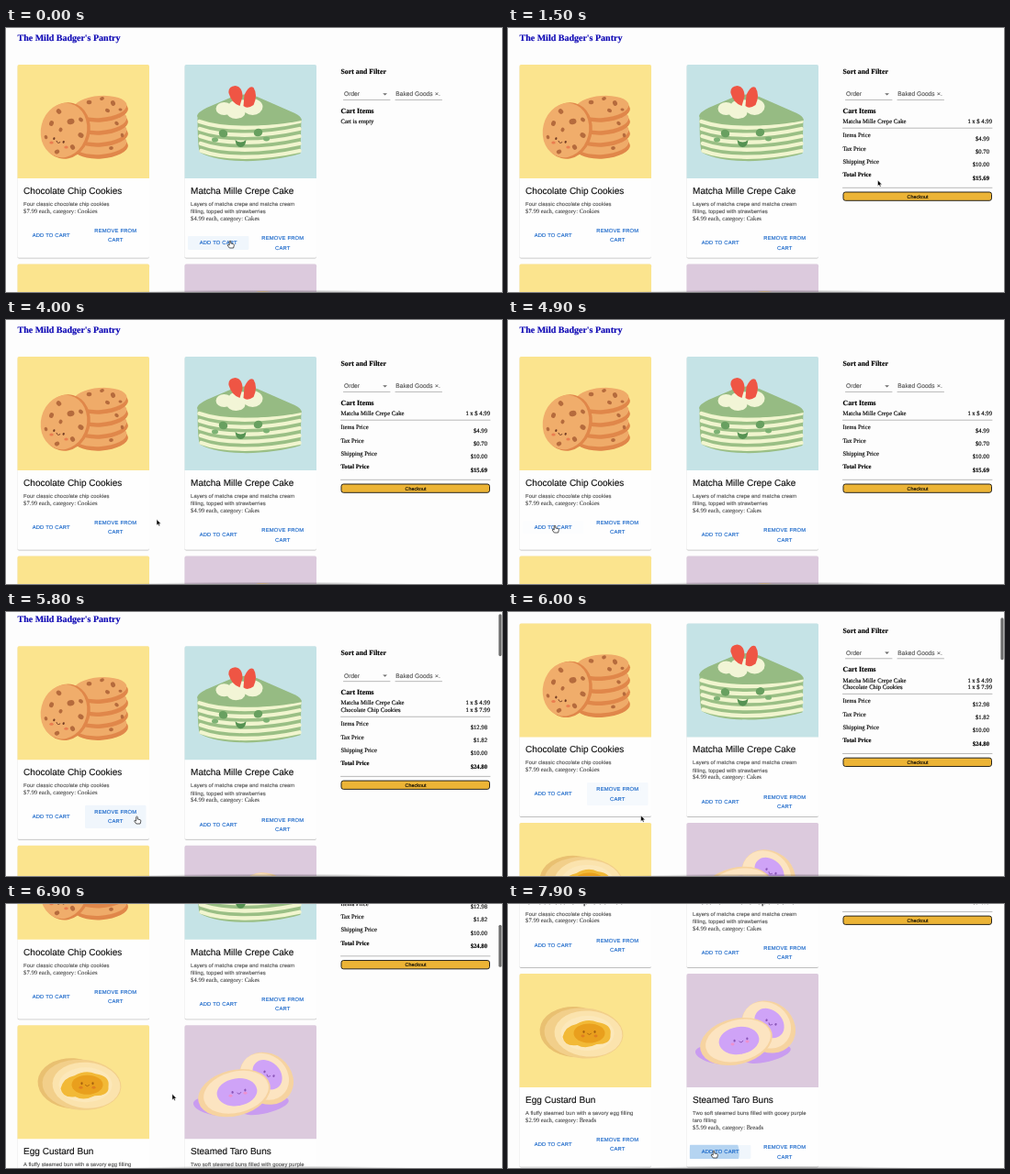
These frames come from a looping animation (540x288 px, 8 s). An HTML page:

```html
<!DOCTYPE html>
<html lang="en">
<head>
<meta charset="utf-8">
<title>Bakery shop</title>
<style>
  html, body { margin: 0; width: 100%; height: 100%; overflow: hidden; background: #fdfdfd; }
  svg { display: block; text-rendering: geometricPrecision; }
  #stage { width: 100vw; height: 100vh; }
  text {
    font: 6.67px "Liberation Serif", "Times New Roman", serif; white-space: pre;
    color: #000; fill: currentColor; stroke: currentColor; stroke-width: .14;
  }
  .brand { font-size: 10px; font-weight: bold; color: #0c06b4; }
  .head { font-size: 7.8px; font-weight: bold; }
  .bold { font-weight: bold; }
  .name, .desc, .btn, .field, .pay { font-family: "Liberation Sans", Arial, sans-serif; }
  .name { font-size: 10px; color: #111; }
  .desc { font-size: 5.83px; letter-spacing: .01em; color: #585858; }
  .price { color: #333; stroke-width: .04; }
  .btn { font-size: 5.83px; letter-spacing: .0286em; color: #1363c8; text-anchor: middle; }
  .field { color: #555; }
  .pay { font-size: 5.4px; text-anchor: middle; }
  .end { text-anchor: end; }
</style>
</head>
<body>
<svg id="stage" viewBox="0 0 540 288" xmlns="http://www.w3.org/2000/svg">
  <defs>
    <radialGradient id="dock">
      <stop offset="0" stop-color="#000" stop-opacity=".35"/>
      <stop offset=".6" stop-color="#000" stop-opacity=".2"/>
      <stop offset="1" stop-color="#000" stop-opacity="0"/>
    </radialGradient>
    <filter id="lift" x="-5%" y="-5%" width="110%" height="110%">
      <feDropShadow dx="0" dy=".7" stdDeviation=".7" flood-opacity=".35"/>
    </filter>
  </defs>
  <rect width="540" height="288" fill="#fdfdfd"/>
  <g id="page"></g>
  <rect id="bar" x="536.4" width="3.2" height="46" rx="1.6" fill="#6c6c6c"/>
  <ellipse cx="287" cy="289.5" rx="180" ry="4" fill="url(#dock)"/>
  <g id="pointer" stroke-linejoin="round">
    <path id="arrow" d="M0 0V6.4L1.5 5.1L2.5 7.3L3.6 6.8L2.7 4.7H4.7Z" fill="#000" stroke="#fff" stroke-width=".5"/>
    <path id="hand" d="M-.8 .6Q0-.4.8 .6V3L3.6 3.6Q4.5 4 4.3 5.2L3.6 8H-.7L-2.8 5.1Q-2.7 3.9-1.6 4.5L-.8 5.1Z" fill="#fff" stroke="#222" stroke-width=".75"/>
  </g>
</svg>
<script>
const LOOP = 8000;
const $ = id => document.getElementById(id);
const clamp = v => Math.min(1, Math.max(0, v));
const smooth = u => u * u * (3 - 2 * u);
const text = (x, y, s, cls = '') => `<text x="${x}" y="${y}" class="${cls}">${s}</text>`;
const oval = (x, y, rx, ry, fill, turn = 0) =>
  `<ellipse cx="${x}" cy="${y}" rx="${rx}" ry="${ry}" fill="${fill}" transform="rotate(${turn} ${x} ${y})"/>`;
const shape = (d, fill) => `<path d="${d}" fill="${fill}"/>`;
const line = (d, color, w) => `<path d="${d}" fill="none" stroke="${color}" stroke-width="${w}" stroke-linecap="round"/>`;
const rule = (x1, x2, y, color = '#8a8a8a') => line(`M${x1} ${y}H${x2}`, color, .6);
const face = (x, y, gap, color, turn = 0) => `<g transform="translate(${x} ${y}) rotate(${turn})">` +
  oval(-gap, 0, 1.1, 1.4, color) + oval(gap, 0, 1.1, 1.4, color) + line('M-2 1.6Q0 4.6 2 1.6', color, .9) + '</g>';

function cookies() {
  const chips = pts => pts.map(([x, y, r]) => oval(x, y, r, r * .8, '#b56b3d', x * 37)).join('');
  let s = '';
  for (const y of [86, 73, 60, 46]) {
    s += oval(91, y + 4, 29.5, 12.5, '#e0874a', -4) + oval(90, y, 29, 12, '#efab69', -4);
  }
  s += chips([[78, 41, 2.8], [92, 37, 2.4], [104, 42, 3], [98, 50, 2.6], [112, 49, 2],
    [108, 64, 2.4], [114, 77, 2.2], [102, 91, 2.4]]);
  s += oval(53, 72, 26, 31, '#e0874a', 14) + oval(50.5, 71.5, 25, 30, '#f0ad6b', 14);
  s += chips([[45, 51, 3], [58, 62, 4], [69, 60, 2.6], [37, 64, 3], [47, 71, 2.4], [69, 77, 3.2],
    [60, 90, 3], [31, 79, 2.2], [43, 95, 2.8]]);
  return s + oval(37, 85, 2.2, 1.5, '#ea7d50') + oval(53, 90, 2.2, 1.5, '#ea7d50') + face(45, 82.5, 5.5, '#713b24', 20);
}

function crepe() {
  let s = shape('M14 55C40 67 85 68 127 59L126 97C88 108 40 108 17 96Q14 94 14 55Z', '#9abf85');
  for (let k = 0; k < 5; k++) {
    const y = 62 + 8 * k;
    s += line(`M${16 + k * .5} ${y}C42 ${y + 9} 85 ${y + 9} 125 ${y}`, '#f1f5cf', 4.3);
  }
  s += shape('M14 57Q12 53 24 47L52 35Q66 30 79 35L120 53Q128 57 127 61C88 69 36 68 14 57Z', '#96bb83');
  s += oval(43, 48, 9, 7, '#f2f5d6') + oval(56, 52, 10, 7, '#f2f5d6') + oval(74, 46, 11, 9, '#f2f5d6') + oval(60, 45, 12, 7, '#f2f5d6');
  s += shape('M48 31Q47 24 55 23Q63 24 63 35L60 45Q51 42 48 31Z', '#ef5544');
  s += shape('M65 33Q70 22 75 25Q80 33 75 44Q68 49 64 45Z', '#ef5544');
  s += oval(42, 75, 4.8, 4.2, '#68a060', 20) + oval(80, 74, 4.8, 4.2, '#68a060', -20);
  s += oval(33, 82, 3.5, 2.4, '#7db274') + oval(89, 81, 3.5, 2.4, '#7db274');
  return s + shape('M55 82Q61 87 67 82Q66 90 61 90Q56 90 55 82Z', '#559252');
}

function custard() {
  return oval(60, 63.5, 38, 27.5, '#e9c071', 4) + oval(70, 65, 43, 27.5, '#f2cf8a', 4) +
    oval(75, 65.5, 37, 25, '#fbe3ad', 4) + oval(74, 65, 29, 19, '#fce8ba') +
    shape('M47 69Q50 57 62 55Q74 48 85 53Q101 55 99 67Q100 77 84 77Q72 83 63 78Q49 80 47 69Z', '#f2b936') +
    oval(76, 65, 17, 10.5, '#e99f1d') + oval(69, 68, 2, 1.4, '#df7f20') + oval(83, 68, 2, 1.4, '#df7f20') +
    face(76, 63.5, 6, '#a5620f');
}

function taro() {
  return oval(31, 89, 22, 9, '#c99cf0', 12) + oval(88, 88, 26, 8, '#c99cf0', -14) +
    oval(89, 58, 31, 27, '#f6d3a0', 38) + oval(87, 56, 28, 24, '#fce4c1', 38) + oval(90, 54, 18, 14, '#cfa3f7', 45) +
    face(92, 53, 5.5, '#8a55b8', 25) +
    oval(54, 74, 40, 25, '#f6d3a0', -14) + oval(56, 73, 36, 22.5, '#fce4c1', -14) + oval(57, 73, 22, 15, '#cfa3f7', -8) +
    oval(50, 77, 2, 1.4, '#ed91cf') + oval(66, 74, 2, 1.4, '#ed91cf') + face(59, 72, 7, '#8a55b8', -10);
}

const CARDS = [
  { x: 12.5, y: 40, bg: '#fbe48e', art: cookies, name: 'Chocolate Chip Cookies',
    desc: ['Four classic chocolate chip cookies'], price: 7.99, kind: 'Cookies' },
  { x: 194.5, y: 40, bg: '#c5e3e6', art: crepe, name: 'Matcha Mille Crepe Cake',
    desc: ['Layers of matcha crepe and matcha cream', 'filling, topped with strawberries'], price: 4.99, kind: 'Cakes' },
  { x: 12.5, y: 257.5, bg: '#fbe48e', art: custard, name: 'Egg Custard Bun',
    desc: ['A fluffy steamed bun with a savory egg filling'], price: 2.99, kind: 'Breads' },
  { x: 194.5, y: 257.5, bg: '#dccadd', art: taro, name: 'Steamed Taro Buns',
    desc: ['Two soft steamed buns filled with gooey purple', 'taro filling'], price: 5.99, kind: 'Breads' },
];

function button(id, x, mid, h, labels) {
  const rows = labels.map((s, i) => text(x + 33.4, mid + 2.1 + (i - (labels.length - 1) / 2) * 10.2, s, 'btn')).join('');
  return `<svg x="${x}" y="${mid - h / 2}" width="66.8" height="${h}" overflow="hidden">
    <rect id="hover${id}" width="66.8" height="${h}" rx="1.7" fill="#1976d2" opacity="0"/>
    <circle id="ripple${id}" fill="#1976d2" opacity="0"/></svg>` + rows;
}

function card(c, i) {
  const extra = 8.3 * (c.desc.length - 1), mid = 186 + extra;
  return `<g transform="translate(${c.x} ${c.y})">
    <rect width="143.5" height="210.5" rx="1.7" fill="#fefefe" filter="url(#lift)"/>
    <path d="M0 124V1.7Q0 0 1.7 0H141.8Q143.5 0 143.5 1.7V124Z" fill="${c.bg}"/>` + c.art() +
    text(6.6, 141, c.name, 'name') +
    c.desc.map((s, k) => text(6.6, 154 + 8.3 * k, s, 'desc')).join('') +
    text(6.6, 161.8 + extra, `$${c.price} each, category: ${c.kind}`, 'price') +
    button(i + 'add', 3.3, mid, 15.2, ['ADD TO CART']) +
    button(i + 'remove', 73.4, mid, 25.4, ['REMOVE FROM', 'CART']) + '</g>';
}

function cart(items) {
  if (!items.length) return text(364.5, 104.2, 'Cart is empty');
  const money = v => '$' + v.toFixed(2);
  const sum = items.reduce((a, c) => a + c.price, 0), tax = sum * .14, ship = 10;
  const y = 7.8 * (items.length - 1);
  let s = items.map((c, i) => text(364.5, 104.2 + 7.6 * i, c.name) +
    text(527, 104.2 + 7.6 * i, `1 x $ ${c.price}`, 'end')).join('');
  s += rule(364.5, 527, 109.2 + y);
  [['Items Price', sum], ['Tax Price', tax], ['Shipping Price', ship], ['Total Price', sum + tax + ship]].forEach(([k, v], i) => {
    const b = i === 3 ? ' bold' : '', row = 119.3 + y + 14.3 * i;
    s += text(364.5, row, k, b) + text(524, row + 3.3, money(v), 'end' + b);
  });
  return s + rule(364.5, 527, 174.3 + y) +
    `<rect x="365" y="${179 + y}" width="161.5" height="9.3" rx="2.4" fill="#ecb436" stroke="#111" stroke-width=".9"/>` +
    text(446, 185.6 + y, 'Checkout', 'pay');
}

$('page').innerHTML = text(12.5, 14, 'The Mild Badger\'s Pantry', 'brand') +
  text(364.5, 50.2, 'Sort and Filter', 'head') +
  text(368, 74.3, 'Order', 'field') + shape('M410.2 71.2H415L412.6 73.6Z', '#6a6a6a') + rule(367.5, 418, 78.4) +
  text(424.3, 74.3, 'Baked Goods', 'field') + text(467, 74.3, '×.', 'field') + rule(424, 474.5, 78.4) +
  text(364.5, 93, 'Cart Items', 'head') + '<g id="cart"></g>' + CARDS.map(card).join('');

// Each key: time, then values; eased between neighbours.
const PATH = [[0, 244, 232], [950, 244, 232], [1450, 402.5, 166], [1600, 402.5, 166], [2100, 396, 170], [2450, 379, 180],
  [2800, 315, 208.5], [3000, 314, 209], [4830, 51, 224], [5300, 51, 224], [5680, 142.5, 223], [5900, 142.5, 223],
  [6600, 180, 206], [6850, 180, 206], [7450, 224, 269], [LOOP, 224, 269]];
const SCROLL = [[0, 0], [5720, 0], [6600, 114.7], [6750, 114.7], [7350, 181.5], [LOOP, 181.5]];
const HOVERS = [['1add', -400, 1000], ['0add', 4870, 5400], ['0remove', 5520, 5900], ['3add', 7360, 8400]];
// Card, time of the press, ripple centre; the cart follows after a short delay.
const CLICKS = [[1, 800, 46.2], [0, 5100, 35.2], [3, 7720, 26.4]];
const CART_DELAY = 130;

function at(keys, t) {
  const i = keys.findIndex(k => k[0] > t), a = keys[i - 1], b = keys[i];
  const u = smooth((t - a[0]) / (b[0] - a[0]));
  return a.slice(1).map((v, k) => v + (b[k + 1] - v) * u);
}

let shown = -1;
function render(t) {
  const [scroll] = at(SCROLL, t), [x, y] = at(PATH, t);
  $('page').setAttribute('transform', `translate(0 ${-scroll})`);
  $('bar').setAttribute('y', 1.7 + scroll * .168);
  $('bar').setAttribute('opacity', t < 5720 ? 0 : 1 - clamp((t - 7500) / 250));

  const items = CLICKS.filter(c => t >= c[1] + CART_DELAY).map(c => CARDS[c[0]]);
  if (items.length !== shown) {
    $('cart').innerHTML = cart(items);
    shown = items.length;
  }

  let over = false;
  for (const [id, from, to] of HOVERS) {
    over = over || (t >= from && t < to);
    $('hover' + id).setAttribute('opacity', .06 * clamp((t - from) / 250) * (1 - clamp((t - to) / 250)));
  }
  for (const [i, from, cx] of CLICKS) {
    const age = t - from, u = clamp(age / 550), el = $(`ripple${i}add`);
    el.setAttribute('cx', cx);
    el.setAttribute('cy', 9);
    el.setAttribute('r', 50 * (1 - (1 - u) ** 2));
    el.setAttribute('opacity', age < 0 ? 0 : .27 * (1 - clamp((age - 220) / 400)));
  }
  $('pointer').setAttribute('transform', `translate(${x} ${y})`);
  $('hand').setAttribute('visibility', over ? 'visible' : 'hidden');
  $('arrow').setAttribute('visibility', over ? 'hidden' : 'visible');
}

const start = performance.now();
function tick() {
  render((performance.now() - start) % LOOP);
  requestAnimationFrame(tick);
}
tick();
</script>
</body>
</html>
```
